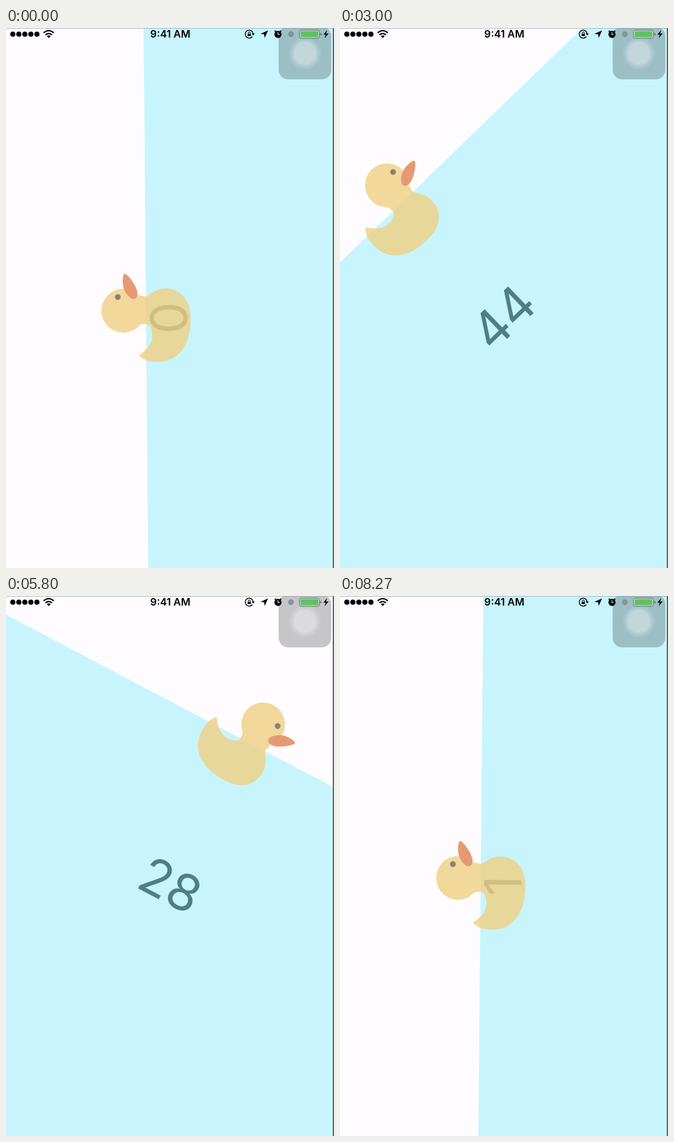
These frames come from a looping animation (480 px wide and 788 px high, 8340 ms). An HTML page:

```html
<!DOCTYPE html>
<html lang="en">
<head>
<meta charset="utf-8">
<title>Duck level</title>
<style>
  html, body { margin: 0; width: 100%; height: 100%; overflow: hidden; background: #fefcff; }
  svg { display: block; width: 100%; height: 100%; }
  text { font-family: Inter, Roboto, sans-serif; text-anchor: middle; }
  .num { font-size: 74px; font-weight: 400; fill: #4f7f86; }
  .water { fill: #c8f5fd; }
</style>
</head>
<body>
<svg viewBox="0 0 480 788">
  <rect width="480" height="788" fill="#fefcff"/>

  <!-- tilted phone: origin is where the duck meets the water line -->
  <g id="side">
    <rect class="water" x="-1500" width="3000" height="2500"/>
    <text class="num" id="sideNum"></text>
    <g opacity=".8">
      <path fill="#f0d082" d="M-11,-10 A32,32 0 1 1 34,-11 C33,-6 31,-2 32,1 C36,8 43,16 43,28
        C43,49 28,65 2,65 C-34,67 -66,50 -64,15 C-64,4 -61,-5 -54,-11
        C-46,2 -36,9 -26,9 C-16,9 -8,5 -9,-2 C-9,-5 -9,-8 -11,-10Z"/>
      <path fill="#df8251" d="M65,-31 C63,-34 54,-34 46,-33 C38,-31 30,-25 28,-19
        C27,-13 35,-11 41,-13 C51,-16 66,-28 65,-31Z"/>
      <circle cx="31" cy="-41" r="4.2" fill="#6d6256"/>
    </g>
  </g>

  <!-- phone lying flat -->
  <g id="flat">
    <rect class="water" width="480" height="788"/>
    <text class="num" id="flatNum" x="239" y="448"></text>
    <g id="front">
      <path fill="#e6c239" stroke="#efcf9a" d="M203,417 C194,403 197,364 236,364 C274,364 279,400 272,413
        C284,418 297,425 296,440 C294,465 275,477 238,477 C205,477 186,465 183,442 C183,428 193,421 203,417Z"/>
      <path fill="#cc483a" d="M217,409 C224,405 230,393 237,392 C244,393 250,402 258,405
        C254,413 246,417 236,417 C228,417 220,415 217,409Z"/>
      <path fill="#b8463a" d="M222,406 C229,402 231,393 237,392 C243,393 247,400 252,403 C242,401 232,402 222,406Z"/>
      <g fill="#1c2830">
        <ellipse cx="208" cy="397" rx="4.6" ry="7"/>
        <ellipse cx="265" cy="392" rx="4.6" ry="7" transform="rotate(-8 265 392)"/>
      </g>
      <g fill="#dfe8ea">
        <circle cx="208.5" cy="393.5" r="1.4"/>
        <circle cx="264.5" cy="389" r="1.4"/>
      </g>
    </g>
  </g>

  <!-- floating button -->
  <rect x="399" y="-2" width="77" height="77" rx="14" opacity=".22"/>
  <g fill="#fff">
    <circle cx="437.5" cy="37" r="23" opacity=".1"/>
    <circle cx="437.5" cy="37" r="20" opacity=".12"/>
    <circle cx="437.5" cy="37" r="17" opacity=".2"/>
  </g>

  <!-- status bar -->
  <path d="M10,9h36" stroke="#000" stroke-width="7.6" stroke-linecap="round" stroke-dasharray="0 8.8"/>
  <path d="M55,7 Q62.5,0.5 70,7 M57.8,10 Q62.5,6 67.2,10" fill="none" stroke="#000" stroke-width="2"/>
  <path d="M59.8,11.8 Q62.5,9.6 65.2,11.8 L62.5,14.8Z"/>
  <text x="240.5" y="14.3" font-size="15" font-weight="600">9:41 AM</text>
  <path d="M360.5,12.5 A5.8,5.8 0 1 1 361.6,8" fill="none" stroke="#000" stroke-width="1.3"/>
  <path d="M359.6,8h4.4l-2.2,3z M353.6,8.4h4.8v3.4h-4.8z"/>
  <path d="M354.5,8.5v-1.2a1.5,1.5 0 0 1 3,0v1.2" fill="none" stroke="#000"/>
  <path d="M383.5,3.5 L378.6,14.5 L377.8,9.2 L372.5,8.4Z"/>
  <circle cx="398" cy="9.3" r="5.2"/>
  <path d="M393.2,5.4l1.8,-1.6 M402.8,5.4l-1.8,-1.6" stroke="#000" stroke-width="1.5"/>
  <path d="M398,6v3.4h2.4" fill="none" stroke="#cdd" stroke-width="1.1"/>
  <circle cx="417" cy="9" r="4.2" fill="#84969b"/>
  <rect x="429.5" y="3" width="29" height="12" rx="2.5" fill="#d5e4e4" stroke="#5d7468"/>
  <rect x="431" y="4.5" width="26" height="9" rx="1.2" fill="#5fc25f"/>
  <path d="M459.8,7v4q2,-.6 2,-2t-2,-2z" fill="#5d7468"/>
  <path d="M470,3 L464.5,9.8 H468 L466,15.2 L472,8 H468.4Z"/>

  <!-- screen edge -->
  <path d="M478.5,0v788" stroke="#7d898e"/>
  <path d="M479.5,0v788" stroke="#4a5256"/>
  <rect width="480" height="1" fill="#8f9a9e" opacity=".6"/>
</svg>
<script>
const LOOP = 8340, FLAT_START = 6700, FLAT_END = 7850;
const $ = id => document.getElementById(id);

// [time, tilt in degrees, water height above the centre]
const tilting = [
  [0, -90.49, 35], [1330, -78.45, 103], [1800, -72.7, 143], [2400, -62.5, 207],
  [3000, -44, 225], [3670, -22.49, 130], [4400, -11, 70], [4800, 0, 42],
  [5200, 10, 95], [5800, 27.7, 238.5], [6300, 33, 370], [6700, 30, 560]
];
const returning = [[7800, -89, 330], [8050, -89.2, 150], [8270, -89.47, 34.5], [8340, -90.49, 35]];

// smooth curve through the keys
function curve(keys, t, k) {
  const last = keys.length - 1;
  let i = 0;
  while (i < last - 1 && t >= keys[i + 1][0]) i++;
  const slope = j => {
    const a = keys[Math.max(j - 1, 0)], b = keys[Math.min(j + 1, last)];
    return (b[k] - a[k]) / (b[0] - a[0]);
  };
  const a = keys[i], b = keys[i + 1], span = b[0] - a[0];
  const u = (t - a[0]) / span, v = 1 - u;
  return v * v * (1 + 2 * u) * a[k] + u * u * (1 + 2 * v) * b[k]
    + span * u * v * (v * slope(i) - u * slope(i + 1));
}

const clamp = x => Math.max(0, Math.min(1, x));

function draw(t) {
  const flat = t >= FLAT_START && t < FLAT_END;
  $('flat').style.display = flat ? '' : 'none';
  $('side').style.display = flat ? 'none' : '';
  if (flat) {
    $('flatNum').textContent = 5 + Math.floor(Math.abs(t - 7200) / 150);
    const fade = Math.min(clamp((t - FLAT_START) / 200), clamp((FLAT_END - t) / 150));
    $('front').setAttribute('opacity', .8 * fade);
    return;
  }
  const keys = t < FLAT_START ? tilting : returning;
  const tilt = curve(keys, t, 1), level = curve(keys, t, 2);
  const size = Math.abs(tilt);
  $('side').setAttribute('transform', `translate(240 423) rotate(${tilt}) translate(0 ${-level})`);
  $('sideNum').setAttribute('y', level + 25);
  $('sideNum').textContent = Math.round(size > 45 ? Math.abs(90 - size) : size);
}

const start = performance.now();
function frame() {
  draw((performance.now() - start) % LOOP);
  requestAnimationFrame(frame);
}
frame();
</script>
</body>
</html>
```
